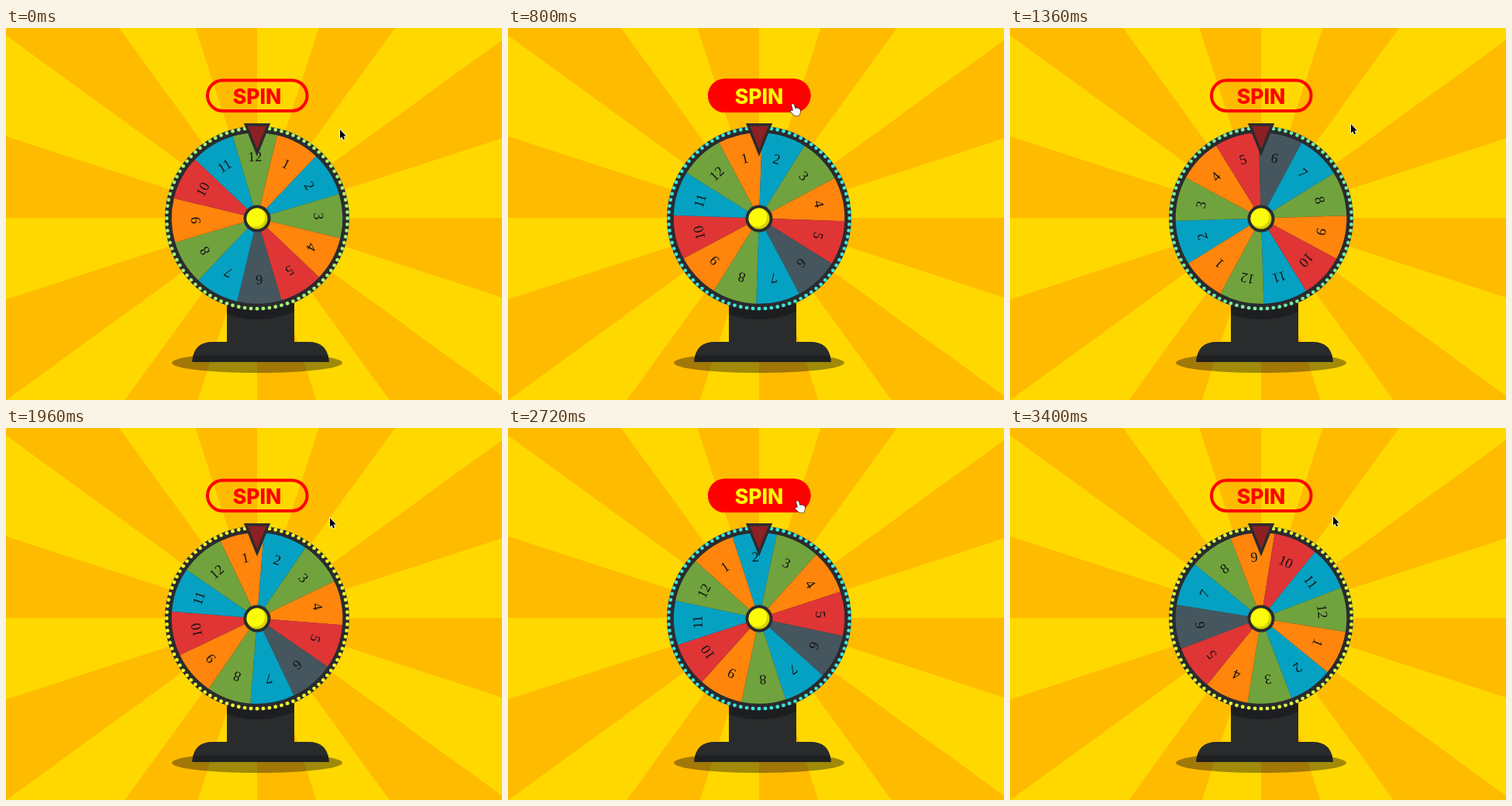
An HTML page with a canvas that plays this animation: 640 px wide and 480 px high, repeating every 3.44 s.

```html
<!DOCTYPE html>
<html lang="en">
<head>
<meta charset="utf-8">
<title>Wheel</title>
<style>
html, body { margin: 0; width: 100%; height: 100%; overflow: hidden; background: #ffd800; }
canvas { display: block; }
</style>
</head>
<body>
<canvas id="stage" width="640" height="480"></canvas>
<script>
const g = document.getElementById('stage').getContext('2d');
const LOOP = 3440, STEP = 40, TAU = Math.PI * 2;
const CX = 324, CY = 245.5, DARK = '#2a2b2e';
const COLORS = { O: '#ff850c', B: '#05a1c3', G: '#70a33d', R: '#df3535', S: '#45565e' };
const SLICES = 'OBGORSBGORBG';

// moves: [start, end, value reached]
const SPINS = [[503, 1954, [1041]], [2378, 3829, [1937]]];
const HOVERS = [[400, 600, [1]], [960, 1160, [0]], [2160, 2360, [1]], [3000, 3200, [0]]];
const LIGHTS = [[0, 950, [1]], [950, 1980, [0]], [1980, 2800, [1]], [2800, 3440, [.1]]];
const MOUSE = [[340, 430, [366, 98]], [860, 1150, [440, 124]], [1400, 1800, [418, 116]],
  [2000, 2250, [372, 94]], [2880, 3250, [417, 114]]];

const ARROW = new Path2D('M0 0V13.5L3.1 10.8L5.2 15.6L7.6 14.5L5.5 9.9H9.8Z');
const HAND = new Path2D('M0 1Q1.5-1 3 1L4.6 6Q6 4.5 7 5.8Q8.6 4.8 9.3 6.5Q11 6 11 8.5V11L9.5 15H4L-1.5 10Q-1.5 8 1 8.5L2 9Z');
const BASE = new Path2D('M240.5 431V428Q243 405 267 405H390Q414 405 416.5 428V431Z');

const clamp = x => Math.max(0, Math.min(1, x));
const rad = deg => deg * Math.PI / 180;
const mix = (a, b, k) => a.map((v, i) => v + (b[i] - v) * k);
const rgb = c => `rgb(${c.map(Math.round)})`;
const linear = x => x;
const smooth = x => (1 - Math.cos(x * Math.PI)) / 2;

// cubic-bezier(.25, .1, .25, 1)
function ease(x) {
  let lo = 0, hi = 1;
  for (let i = 0; i < 24; i++) {
    const u = (lo + hi) / 2;
    if (.75 * u * (1 - u) + u ** 3 < x) lo = u; else hi = u;
  }
  return .3 * lo * (1 - lo) ** 2 + 3 * lo * lo * (1 - lo) + lo ** 3;
}

function follow(value, moves, t, curve) {
  return moves.reduce((v, [start, end, goal]) => mix(v, goal, curve(clamp((t - start) / (end - start)))), value);
}

function fill(color) { g.fillStyle = color; g.fill(); }
function disc(x, y, r, color) { g.beginPath(); g.arc(x, y, r, 0, TAU); fill(color); }
function sector(x, y, r, from, to, color) {
  g.beginPath();
  g.moveTo(x, y);
  g.arc(x, y, r, rad(from), rad(to));
  fill(color);
}

function rays() {
  g.fillStyle = '#ffd800';
  g.fillRect(0, 0, 640, 480);
  for (let a = 0; a < 360; a += 36) sector(324, 245, 450, a, a + 18, '#ffbb00');
}

function stand() {
  g.beginPath();
  g.ellipse(324, 432, 110, 13, 0, 0, TAU);
  fill('rgba(20,20,20,.4)');
  g.save();
  g.beginPath();
  g.rect(285, 340, 87, 67);
  fill('#292b2c');
  g.clip();
  disc(CX, 257, 119, '#1d1e20');
  g.restore();
  g.save();
  g.clip(BASE);
  g.fillStyle = '#292b2c';
  g.fillRect(240, 404, 180, 28);
  g.fillStyle = '#1f2022';
  g.fillRect(240, 422.5, 180, 10);
  g.restore();
}

function wheel(angle, light) {
  disc(CX, CY, 119, DARK);
  const color = rgb(mix([240, 250, 45], [55, 228, 222], light));
  for (let i = 0; i < 92; i++) {
    const a = i / 92 * TAU;
    disc(CX + 116.7 * Math.cos(a), CY + 116.7 * Math.sin(a), 2.4, color);
  }
  g.save();
  g.translate(CX, CY);
  g.rotate(rad(angle));
  g.font = '18px "Liberation Serif", "Times New Roman", serif';
  [...SLICES].forEach((c, i) => {
    const turn = (i + 1) * 30;
    sector(0, 0, 110.3, turn - 106.5, turn - 76.5, COLORS[c]);
  });
  g.fillStyle = '#141414';
  for (let n = 1; n <= 12; n++) {
    g.save();
    g.rotate(rad(n * 30 - 2));
    g.fillText(n, 0, -73.5);
    g.restore();
  }
  g.restore();

  disc(324, 246, 17.5, DARK);
  g.save();
  disc(324, 246, 13.5, '#d6d200');
  g.clip();
  disc(321.8, 243.8, 12.5, '#fcfc08');
  g.restore();

  g.beginPath();
  g.moveTo(309.5, 124.8);
  g.lineTo(338.5, 124.8);
  g.lineTo(324, 161);
  g.closePath();
  fill('#8c2022');
  g.lineWidth = 3.5;
  g.lineJoin = 'miter';
  g.strokeStyle = DARK;
  g.stroke();
}

function button(hover) {
  g.beginPath();
  g.roundRect(258, 65.5, 132.5, 43.5, 21.75);
  fill(`rgba(255,0,0,${hover})`);
  g.beginPath();
  g.roundRect(260, 67.5, 128.5, 39.5, 19.75);
  g.lineWidth = 4;
  g.strokeStyle = '#f00';
  g.stroke();
  g.font = '800 26.5px Inter, sans-serif';
  g.fillStyle = rgb(mix([255, 0, 0], [255, 255, 0], hover));
  g.fillText('SPIN', 324, 97.5);
}

function cursor(x, y) {
  const over = x < 390 && y < 109;
  g.save();
  g.translate(x, y);
  if (!over) g.scale(.8, .85);
  g.lineJoin = 'round';
  g.lineWidth = over ? 1.2 : 1.8;
  g.strokeStyle = over ? '#222' : '#fff';
  g.fillStyle = over ? '#fff' : '#000';
  const shape = over ? HAND : ARROW;
  g.stroke(shape);
  g.fill(shape);
  g.restore();
}

function draw(now) {
  const t = Math.floor(now % LOOP / STEP) * STEP;
  g.textAlign = 'center';
  rays();
  stand();
  wheel(follow([0], SPINS, t, ease)[0], follow([.4], LIGHTS, t, smooth)[0]);
  button(follow([0], HOVERS, t, linear)[0]);
  cursor(...follow([431, 131], MOUSE, t, smooth));
}

const began = performance.now();
function tick() {
  draw(performance.now() - began);
  requestAnimationFrame(tick);
}
tick();
</script>
</body>
</html>
```
